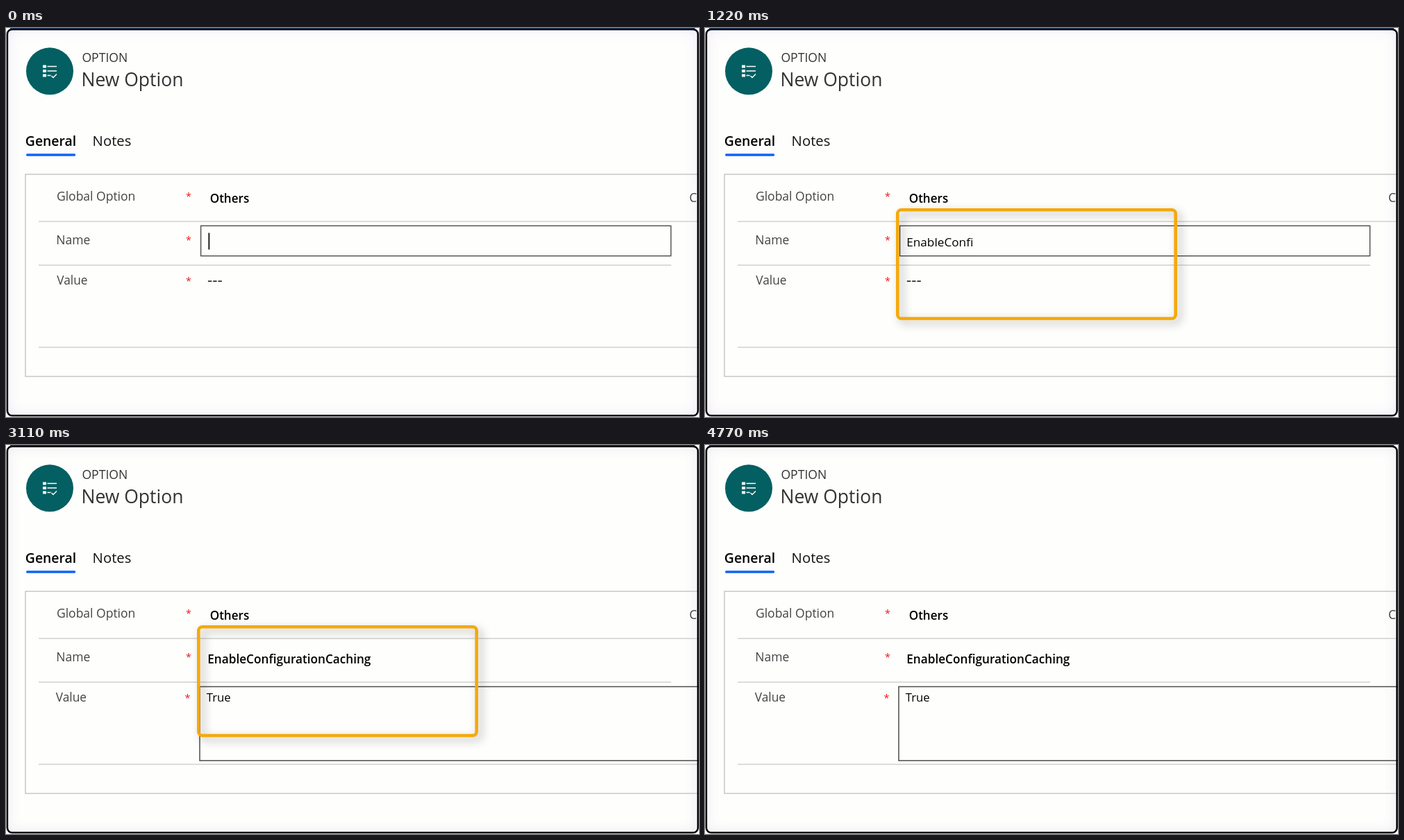
Animation, 998 px wide and 561 px high, one loop 4.85 s. Source, as an HTML page with a canvas:

```html
<!DOCTYPE html>
<html lang="en">
<head>
<meta charset="utf-8">
<title>New Option form</title>
<style>
  html, body { margin: 0; width: 100%; height: 100%; overflow: hidden; background: #fff; }
  canvas { display: block; width: 998px; height: 561px; }
</style>
</head>
<body>
<canvas id="stage" width="998" height="561"></canvas>
<script>
const W = 998, H = 561, LOOP = 4850;
const ctx = document.getElementById('stage').getContext('2d');
const FONT = '"Open Sans", "Noto Sans", sans-serif';
const NAME = 'EnableConfigurationCaching', VALUE = 'True';

// [ms, characters typed]
const NAME_KEYS = [[680, 0], [945, 6], [1200, 11], [1330, 12], [1510, 18], [1550, 19], [1960, 26]];
const VALUE_KEYS = [[2640, 0], [2900, 4]];

// [from, to] spans in which the caret shows
const NAME_CARET = [[0, 500], [680, 1100], [1800, 2030], [2070, 2140]];
const VALUE_CARET = [[2250, 3110], [3540, 3960], [4420, 4770]];

const VALUE_OPEN = 2140, NAME_DONE = 2400;
const FADE = 780, FADE_IN = 440, FADE_OUT = 3340;

const clamp = v => Math.min(1, Math.max(0, v));
const within = (t, spans) => spans.some(([a, b]) => t >= a && t < b);

function typed(t, keys) {
  if (t < keys[0][0]) return 0;
  for (let i = 1; i < keys.length; i++) {
    const [t0, n0] = keys[i - 1], [t1, n1] = keys[i];
    if (t < t1) return Math.floor(n0 + (n1 - n0) * (t - t0) / (t1 - t0));
  }
  return keys[keys.length - 1][1];
}

function text(str, x, y, size, color = '#000', weight = 400) {
  ctx.font = `${weight} ${size}px ${FONT}`;
  ctx.fillStyle = color;
  ctx.fillText(str, x, y);
  return x + ctx.measureText(str).width;
}

function line(points, color, width) {
  ctx.strokeStyle = color;
  ctx.lineWidth = width;
  ctx.beginPath();
  points.forEach(([x, y]) => ctx.lineTo(x, y));
  ctx.stroke();
}

function box(x, y, w, h, color, width) {
  ctx.strokeStyle = color;
  ctx.lineWidth = width;
  ctx.strokeRect(x, y, w, h);
}

function caret(x, y) {
  ctx.fillStyle = '#000';
  ctx.fillRect(x, y, 1.7, 24);
}

function edgeShade(t) {
  ctx.save();
  ctx.shadowColor = t < VALUE_OPEN ? 'rgba(125,85,190,.15)' : 'rgba(125,100,135,.14)';
  ctx.shadowBlur = 20;
  ctx.fillStyle = '#fff';
  ctx.beginPath();
  ctx.rect(-60, -60, W + 120, H + 120);
  ctx.roundRect(1, 1, W - 2, H - 2, 8);
  ctx.fill('evenodd');
  ctx.restore();
}

function header() {
  ctx.fillStyle = '#035f62';
  ctx.beginPath();
  ctx.arc(63, 62.3, 34, 0, Math.PI * 2);
  ctx.fill();

  ctx.fillStyle = '#fff';
  [53.5, 60, 66.5].forEach((y, i) => {
    ctx.fillRect(53, y, 5, 4);
    ctx.fillRect(59.5, y + 1.2, i < 2 ? 13.5 : 5, 1.5);
  });
  line([[65.5, 69], [68, 71.5], [73, 66.5]], '#fff', 1.4);

  text('OPTION', 109.4, 49, 17.6, '#333');
  text('New Option', 108.4, 84, 26.5, '#333');
  text('General', 27.8, 170, 19.4, '#000', 600);
  text('Notes', 124.6, 170, 20.3, '#111');
  ctx.lineCap = 'round';
  line([[30.7, 183], [98.5, 183]], '#0f62fb', 3.5);
  ctx.lineCap = 'butt';
}

function form(t) {
  const open = t >= VALUE_OPEN, shift = open ? -1.5 : 0;
  const label = '#444', rule = '#d0d0d0';

  box(28, 211, W, 291.5, '#c6c6c6', 1.5);
  line([[47, 279], [W, 279]], rule, 1.5);
  line([[47, 342], [958, 342]], rule, 1.5);
  line([[47, 460.5], [W, 460.5]], rule, 1.5);

  text('Global Option', 72.9, 248.5, 17.5, label);
  text('Name', 72.3, 312, 17.5, label);
  text('Value', 73.3 + shift, 370, 17.3, label);
  [248, 311, 370].forEach((y, i) => text('*', 259 + (i === 2 ? shift : 0), y, 14.5, '#f01818'));
  text('Others', 293.7, 252, 17.1, '#000', 600);
  text('C', 984, 251, 17.5, label);

  if (t < NAME_DONE) {
    box(280.6, 285.3, 677, 43.4, '#4c4c4c', 1.4);
    const end = text(NAME.slice(0, typed(t, NAME_KEYS)), 290.2, 315, 17.2);
    if (within(t, NAME_CARET)) caret(Math.max(291.5, end + .3), 295.5);
  } else {
    text(NAME, 290.2, 315, 17.2, '#000', 600);
  }

  if (open) {
    box(279, 348.5, W, 106.7, '#4c4c4c', 1.5);
    const end = text(VALUE.slice(0, typed(t, VALUE_KEYS)), 288.7, 370, 16.8);
    if (within(t, VALUE_CARET)) caret(end + .5, 351);
  } else {
    text('---', 290, 371, 22.5, '#222');
  }
}

function highlight(t) {
  const alpha = clamp((t - FADE_IN) / FADE) * (1 - clamp((t - FADE_OUT) / FADE));
  if (!alpha) return;
  ctx.save();
  ctx.globalAlpha = alpha;
  ctx.shadowColor = 'rgba(0,0,0,.32)';
  ctx.shadowBlur = 13;
  ctx.shadowOffsetX = 5;
  ctx.shadowOffsetY = 5;
  ctx.strokeStyle = '#f5a90b';
  ctx.lineWidth = 4.6;
  ctx.beginPath();
  ctx.roundRect(277.3, 262.3, 400.4, 156.7, 5.5);
  ctx.stroke();
  ctx.restore();
}

function border() {
  ctx.fillStyle = '#24508c';
  ctx.fillRect(6, 0, W - 12, 1);
  ctx.strokeStyle = '#000';
  ctx.lineWidth = 2.5;
  ctx.beginPath();
  ctx.roundRect(1.9, 1.9, 994.6, 557.2, 7);
  ctx.stroke();
}

function draw(t) {
  ctx.fillStyle = '#fefefd';
  ctx.fillRect(0, 0, W, H);
  edgeShade(t);
  header();
  form(t);
  highlight(t);
  border();
}

const start = performance.now();
function tick() {
  draw((performance.now() - start) % LOOP);
  requestAnimationFrame(tick);
}
tick();
</script>
</body>
</html>
```
